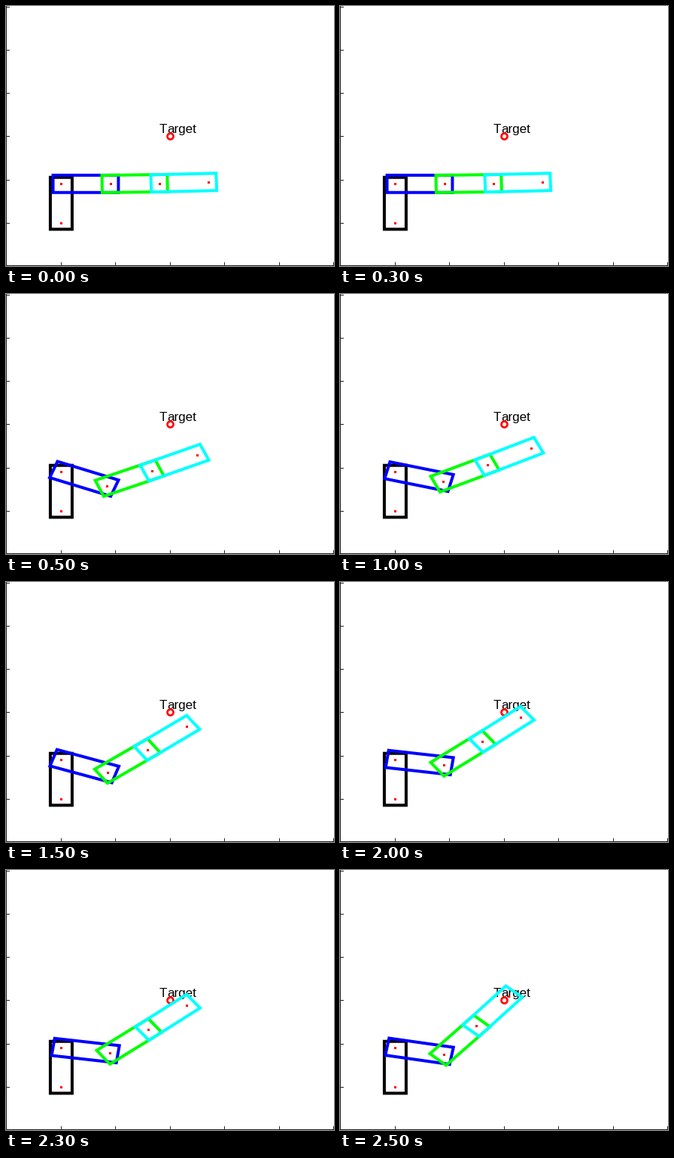
Recreate the animation shown at these times as a matplotlib script. Size 436 px wide and 344 px high, loop 3000 ms.

```python
import numpy as np
import matplotlib.pyplot as plt
from matplotlib.animation import FuncAnimation

W, H, DPI = 436, 344, 100
PX = 72 / DPI              # points per pixel
X0, SX, SY = 1.0, 72.4, 57.2  # left offset and pixels per data unit

REACH, PAD, HALF = 0.9, 0.15, 0.2
SHOULDER = np.array([1.0, 1 + REACH])
TARGET = (3, 3)
FONT = 17                  # text height in pixels
T_ADVANCE = 0.611          # width of a capital T in ems

# Absolute angle of each link in degrees, one row per solver step.
POSES = [
    (0, 0.9, 1.7),
    (-21, 23.1, 23.8),
    (-14.2, 25.1, 25.7),
    (-18.8, 36, 36.7),
    (-8, 37.7, 38.5),
    (-10.1, 47.9, 48.8),
]

plt.rcParams["font.family"] = "Liberation Sans"
fig = plt.figure(figsize=(W / DPI, H / DPI), dpi=DPI, facecolor="white")
ax = fig.add_axes([0, 0, 1, 1])
ax.set_xlim(-X0 / SX, (W - X0) / SX)
ax.set_ylim(0, H / SY)
ax.axis("off")


def to_data(x, y):
    """Convert pixels from the top left corner to data units."""
    return (x - X0) / SX, (H - y) / SY


def pixel_line(x1, y1, x2, y2):
    (a, b), (c, d) = to_data(x1, y1), to_data(x2, y2)
    ax.plot([a, c], [b, d], color="#262626", lw=PX, snap=False,
            solid_capstyle="butt", zorder=1)


def draw_axes():
    pixel_line(0.5, 0, 0.5, H)
    pixel_line(0, H - 0.5, W, H - 0.5)
    for k in range(1, 7):
        x = np.floor(X0 + SX * k) + 0.5
        y = np.floor(H - SY * k + 0.4) + 0.5
        pixel_line(x, H - 5, x, H)
        pixel_line(0, y, 5, y)


def draw_label(x, y):
    # Two pieces, so that no kerning pulls the "a" under the "T".
    for part, shift in (("T", 0), ("arget", T_ADVANCE * FONT)):
        ax.text(*to_data(x + shift, y), part, fontsize=FONT * PX,
                color="black", va="baseline", zorder=2)


def link_outline(joint, angle):
    """Closed box around a link, and the joint at its far end."""
    along = np.array([np.cos(angle), np.sin(angle)])
    across = HALF * np.array([-along[1], along[0]])
    end = joint + REACH * along
    back, front = joint - PAD * along, end + PAD * along
    box = np.array([back + across, front + across,
                    front - across, back - across])
    return box, end


def add_box(color, z):
    box = plt.Polygon(np.zeros((4, 2)), closed=True, fill=False, ec=color,
                      lw=4 * PX, joinstyle="miter", snap=False, zorder=z)
    return ax.add_patch(box)


draw_axes()
draw_label(204, 168)
ax.plot(*TARGET, "o", mfc="none", mec="red", ms=8 * PX, mew=2.67 * PX, zorder=2)

base = add_box("black", 3)
base.set_xy(link_outline(np.array([1.0, 1.0]), np.pi / 2)[0])
links = [add_box(c, 4 + i) for i, c in enumerate(("blue", "lime", "cyan"))]
dots, = ax.plot([], [], "s", color="red", ms=3 * PX, mew=0, zorder=8)


def update(step):
    joint = SHOULDER
    joints = [(1, 1), joint]
    for link, angle in zip(links, np.radians(POSES[step])):
        box, joint = link_outline(joint, angle)
        link.set_xy(box)
        joints.append(joint)
    dots.set_data(*np.transpose(joints))
    return [*links, dots]


anim = FuncAnimation(fig, update, frames=len(POSES), interval=500,
                     repeat=True, repeat_delay=0, blit=False)
plt.show()
```
